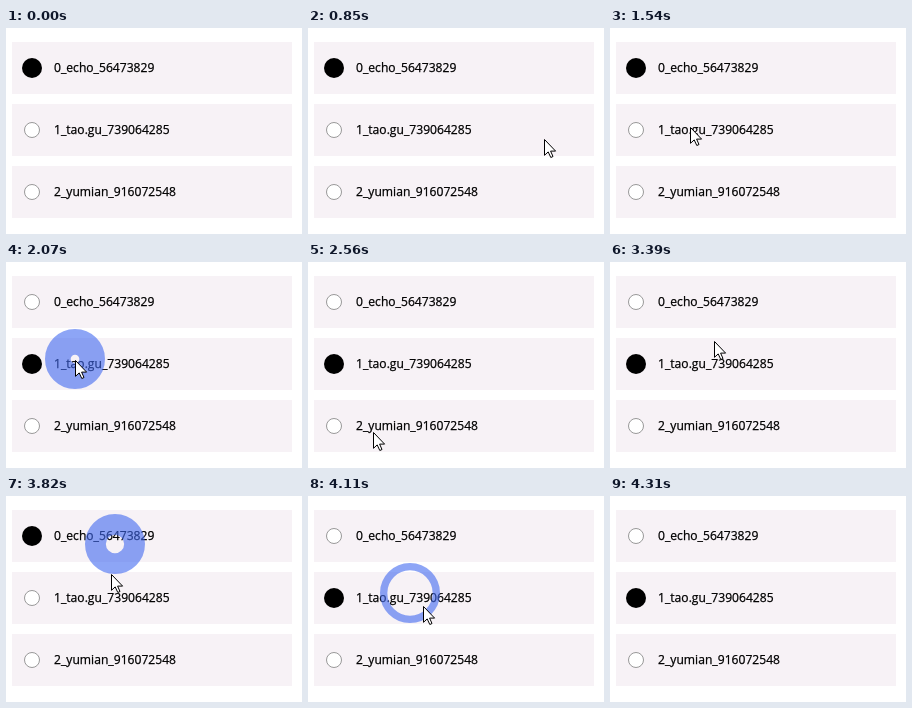
An HTML page for the animation above (4.75 s loop, 296x206 px).

```html
<!DOCTYPE html>
<html lang="en">
<head>
<meta charset="utf-8">
<title>Radio list</title>
<style>
html, body { margin: 0; width: 100%; height: 100%; overflow: hidden; background: #fff; }
body { padding: 14px 0 0 6px; box-sizing: border-box; }
.row {
  position: relative; width: 280px; height: 52px; margin-bottom: 10px;
  background: #f7f2f6; color: #000;
  font: 12.1px/52px "Open Sans", "Noto Sans", sans-serif;
  -webkit-text-stroke: .25px #000;
  text-indent: 42px; white-space: nowrap;
}
.row::before {
  content: ""; position: absolute; left: 12px; top: 18px;
  box-sizing: border-box; width: 16px; height: 16px;
  border: 1px solid #999; border-radius: 50%; background: #fff;
}
.row.on::before {
  left: 10px; top: 16px; width: 20px; height: 20px;
  border: 0; background: #000;
}
svg { position: absolute; left: 0; top: 0; }
</style>
</head>
<body>
<div class="row on">0_echo_56473829</div>
<div class="row">1_tao.gu_739064285</div>
<div class="row">2_yumian_916072548</div>
<svg width="296" height="206" viewBox="0 0 296 206">
  <circle id="ripple" fill="none" stroke="#4169f0" stroke-opacity=".6"/>
  <path id="cursor" d="M.5.5V16.3L4.2 12.9 6.8 18.5 9 17.5 6.6 12.1H11.6Z" fill="#fff" stroke="#000"/>
</svg>
<script>
const LOOP = 4750, RADIUS = 30, RIPPLE_MS = 200, RIPPLE_DELAY = 20;
const ROW_TOP = 14, ROW_PITCH = 62;

// Where the pointer rests, and when it clicks there
const stops = [
  { x: 290, y: 137, arrive: 420, leave: 420 },
  { x: 236, y: 111, arrive: 850, leave: 950 },
  { x: 69, y: 98, arrive: 1750, leave: 2160, click: 2022 },
  { x: 65, y: 170, arrive: 2560, leave: 2790, click: 2710 },
  { x: 100, y: 99, arrive: 2990, leave: 3340, click: 3145 },
  { x: 109, y: 49, arrive: 3560, leave: 3760, click: 3740 },
  { x: 102, y: 98, arrive: 3930, leave: 4100, click: 3940 },
  { x: 204, y: 190, arrive: 4270, leave: 4310 }
];
const clicks = stops.filter(s => s.click);

const rows = document.querySelectorAll(".row");
const ripple = document.getElementById("ripple");
const cursor = document.getElementById("cursor");

const easeOut = k => 1 - (1 - k) ** 2;
const rowAt = y => Math.floor((y - ROW_TOP) / ROW_PITCH);

function show(el, on) {
  el.style.display = on ? "" : "none";
}

function drawRows(t) {
  const last = clicks.findLast(c => c.click <= t);
  const selected = last ? rowAt(last.y) : 0;
  rows.forEach((row, i) => row.classList.toggle("on", i === selected));
}

// A disc whose hole widens until nothing is left
function drawRipple(t) {
  const age = c => t - c.click - RIPPLE_DELAY;
  const active = clicks.find(c => age(c) >= 0 && age(c) < RIPPLE_MS);
  show(ripple, active);
  if (!active) return;
  const hole = RADIUS * age(active) / RIPPLE_MS;
  ripple.setAttribute("cx", active.x);
  ripple.setAttribute("cy", active.y - 1);
  ripple.setAttribute("r", (RADIUS + hole) / 2);
  ripple.setAttribute("stroke-width", RADIUS - hole);
}

function drawCursor(t) {
  const i = stops.findIndex(s => t < s.leave);
  const visible = i > 0;
  show(cursor, visible);
  if (!visible) return;
  const from = stops[i - 1], to = stops[i];
  const k = easeOut(Math.min(1, (t - from.leave) / (to.arrive - from.leave)));
  const mix = axis => Math.round(from[axis] + (to[axis] - from[axis]) * k);
  cursor.setAttribute("transform", `translate(${mix("x")} ${mix("y")})`);
}

const start = performance.now();
function tick() {
  const t = (performance.now() - start) % LOOP;
  drawRows(t);
  drawRipple(t);
  drawCursor(t);
  requestAnimationFrame(tick);
}
tick();
</script>
</body>
</html>
```
